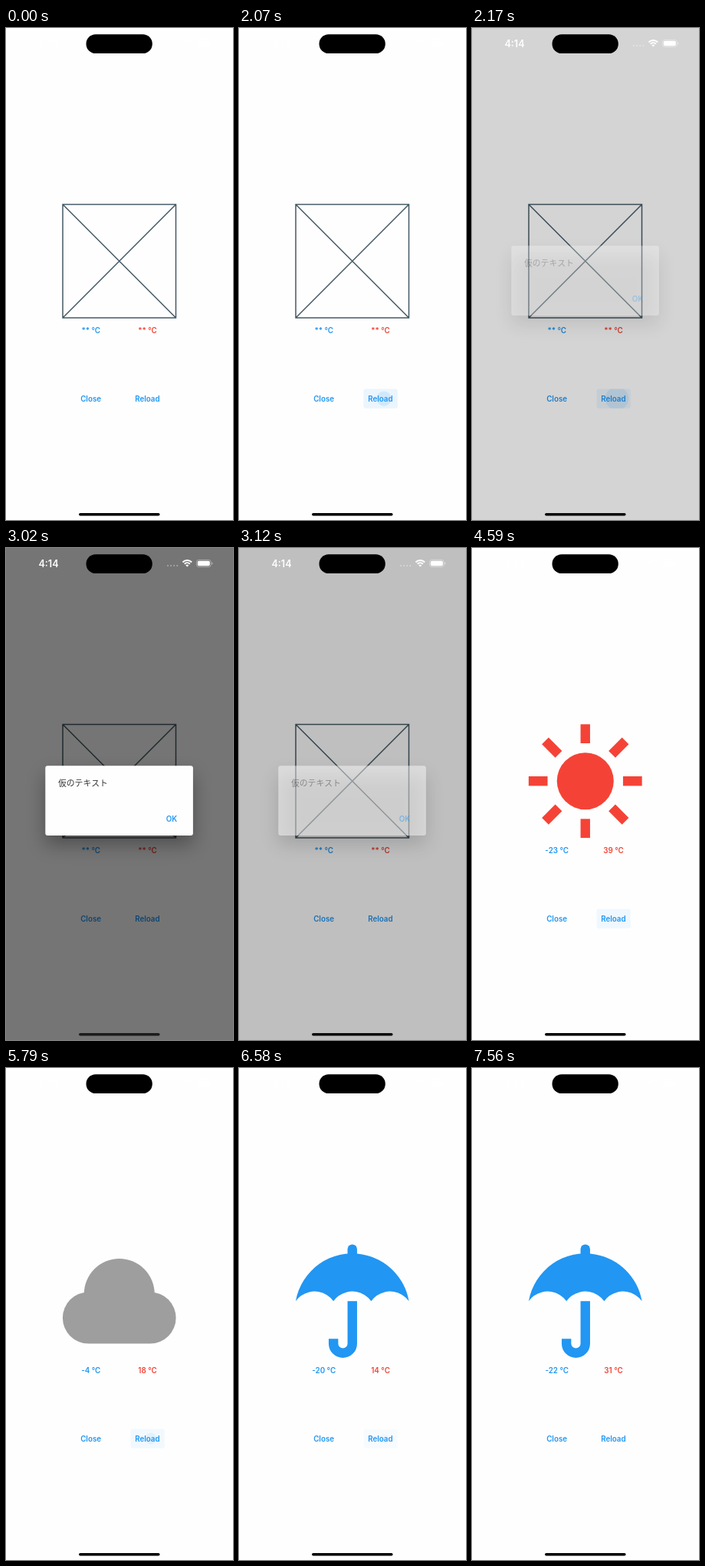
Recreate the animation shown at these times as an HTML page with a canvas. Size 296 by 640 pixels, loop 7.6 s.

```html
<!DOCTYPE html>
<html lang="ja">
<head>
<meta charset="utf-8">
<title>Weather</title>
<style>
  html, body { margin: 0; width: 100%; height: 100%; overflow: hidden; background: #fefefe; }
  canvas { display: block; width: 296px; height: 640px; }
</style>
</head>
<body>
<canvas id="stage"></canvas>
<script>
const W = 296, H = 640, LOOP = 7600;
const BLUE = '#2196f3', RED = '#f44336', GREY = '#9e9e9e', SLATE = '#455a64';
const LATIN = 'Inter, Roboto, sans-serif';
const CX = 147.75, CY = 303.2;
const FADE_OUT = 240, DIALOG_FADE = 150, DISMISS = 3010;

const canvas = document.getElementById('stage');
const ctx = canvas.getContext('2d');
const dpr = window.devicePixelRatio || 1;
canvas.width = W * dpr;
canvas.height = H * dpr;

// Bursts of screen updates: first change, last change, number of steps
const bursts = [
  [1960, 2390, 5], [3020, 3120, 2], [3300, 3870, 6], [4040, 4700, 7],
  [4810, 5460, 7], [5680, 6360, 7], [6470, 6830, 4], [7000, 7560, 6]
];

// Taps on Reload: finger down, highlight gone
const taps = [
  [1880, 2390], [3300, 3870], [3980, 4700], [4750, 5460],
  [5680, 6360], [6410, 6830], [6940, 7560]
].map(([down, end]) => ({ down, up: end - FADE_OUT, end }));

// Weather before the first tap and after each one; the first tap fails
const reports = [
  [placeholder, '**', '**'],
  [placeholder, '**', '**'],
  [sun, '-36', '25'],
  [sun, '-23', '39'],
  [cloud, '-4', '18'],
  [umbrella, '-20', '14'],
  [umbrella, '-8', '27'],
  [umbrella, '-22', '31']
];

const clamp = v => Math.max(0, Math.min(1, v));
const easeOut = v => 1 - (1 - v) * (1 - v);

// Holds the picture between updates; 5 ms of slack for rounded step times
function snap(t) {
  let shown = 0;
  for (const [from, to, n] of bursts) {
    if (t < from) break;
    const gap = (to - from) / (n - 1);
    shown = from + Math.min(n - 1, Math.floor((t - from + 5) / gap)) * gap;
  }
  return shown;
}

function roundRect(x, y, w, h, r, color) {
  ctx.beginPath();
  ctx.roundRect(x, y, w, h, r);
  ctx.fillStyle = color;
  ctx.fill();
}

function disc(x, y, r, color) {
  ctx.beginPath();
  ctx.arc(x, y, r, 0, Math.PI * 2);
  ctx.fillStyle = color;
  ctx.fill();
}

function label(text, x, y, color, font = '600 9.8px ' + LATIN, align = 'center') {
  ctx.font = font;
  ctx.textAlign = align;
  ctx.fillStyle = color;
  ctx.fillText(text, x, y);
}

function placeholder() {
  const x = 74, y = 229.5, s = 147.5;
  ctx.strokeStyle = SLATE;
  ctx.lineWidth = 1.5;
  ctx.beginPath();
  ctx.rect(x, y, s, s);
  ctx.moveTo(x, y);
  ctx.lineTo(x + s, y + s);
  ctx.moveTo(x + s, y);
  ctx.lineTo(x, y + s);
  ctx.stroke();
}

function sun() {
  disc(CX, CY, 37, RED);
  for (let i = 0; i < 8; i++) {
    ctx.save();
    ctx.translate(CX, CY);
    ctx.rotate(i * Math.PI / 4);
    ctx.fillRect(-6.2, -73.9, 12.4, 24.7);
    ctx.restore();
  }
}

function cloud() {
  disc(CX, 294, 46, GREY);
  roundRect(73.9, 291.4, 147.7, 67.2, 33.6, GREY);
}

function umbrella() {
  roundRect(CX - 6.2, 229.4, 12.4, 20, [6.2, 6.2, 0, 0], BLUE);

  const rim = 303.2, drop = 13, r = Math.hypot(73.8, drop);
  const tilt = Math.asin(drop / r);
  ctx.beginPath();
  ctx.arc(CX, rim + drop, r, Math.PI + tilt, -tilt);
  const sr = 30.3, half = Math.asin(24.6 / sr), sy = rim + sr * Math.cos(half);
  for (let i = 1; i >= -1; i--) {
    ctx.arc(CX + i * 49.2, sy, sr, -Math.PI / 2 + half, -Math.PI / 2 - half, true);
  }
  ctx.fill();

  ctx.strokeStyle = BLUE;
  ctx.lineWidth = 12.4;
  ctx.beginPath();
  ctx.moveTo(CX, 303.2);
  ctx.lineTo(CX, 358.5);
  ctx.arc(CX - 12.3, 358.5, 12.3, 0, Math.PI);
  ctx.lineTo(CX - 24.6, 352.3);
  ctx.stroke();
}

function highlight(t) {
  const tap = taps.find(({ down, end }) => t >= down && t < end);
  if (!tap) return;
  const { down, up, end } = tap;
  const glow = clamp((t - down) / 200) * clamp((end - t) / FADE_OUT);
  const held = Math.min(t, up) - down, after = Math.max(0, t - up);
  ctx.save();
  ctx.beginPath();
  ctx.roundRect(162.5, 469.5, 44.3, 25.2, 3);
  ctx.clip();
  ctx.fillStyle = `rgba(33,150,243,${0.09 * glow})`;
  ctx.fillRect(160, 468, 50, 30);
  const fade = glow * clamp(1 - after / 200);
  disc(189, 482, 4 + held * 0.03 + after * 0.12, `rgba(33,150,243,${0.14 * fade})`);
  ctx.restore();
}

function dialog(alpha) {
  if (alpha <= 0) return;
  ctx.save();
  ctx.globalAlpha = alpha;
  ctx.fillStyle = 'rgba(0,0,0,0.54)';
  ctx.fillRect(0, 0, W, H);
  ctx.shadowColor = 'rgba(0,0,0,0.32)';
  ctx.shadowBlur = 24 * dpr;
  ctx.shadowOffsetY = 12 * dpr;
  roundRect(51.3, 283.2, 192.6, 90.8, 3, '#fff');
  ctx.shadowColor = 'transparent';
  label('仮のテキスト', 68, 309.5, '#333', '400 10.8px "Noto Sans CJK JP", "Noto Sans CJK", sans-serif', 'left');
  label('OK', 216, 355.6, BLUE);
  ctx.restore();
}

function statusBar() {
  label('4:14', 55.5, 24.9, '#fff', '600 12.6px ' + LATIN);
  for (let i = 0; i < 4; i++) disc(211 + i * 4.1, 23, 1, 'rgba(255,255,255,0.4)');

  ctx.strokeStyle = '#fff';
  ctx.lineWidth = 2;
  for (const r of [5, 8.3]) {
    ctx.beginPath();
    ctx.arc(236.3, 24.3, r, -Math.PI * 0.75, -Math.PI * 0.25);
    ctx.stroke();
  }
  ctx.fillStyle = '#fff';
  ctx.beginPath();
  ctx.moveTo(236.3, 24.6);
  ctx.arc(236.3, 24.6, 2.9, -Math.PI * 0.75, -Math.PI * 0.25);
  ctx.fill();

  ctx.strokeStyle = 'rgba(255,255,255,0.45)';
  ctx.lineWidth = 0.8;
  ctx.beginPath();
  ctx.roundRect(248.4, 15.4, 18.8, 9.2, 3);
  ctx.stroke();
  roundRect(249.8, 16.7, 16, 6.6, 1.8, '#fff');
  roundRect(268.3, 18.5, 1.1, 3, [0, 1, 1, 0], 'rgba(255,255,255,0.5)');
}

function draw(t) {
  ctx.setTransform(dpr, 0, 0, dpr, 0, 0);
  ctx.fillStyle = '#fefefe';
  ctx.fillRect(0, 0, W, H);

  const [icon, low, high] = reports[taps.filter(({ up }) => up <= t).length];
  icon();
  label(low + ' °C', 110.7, 397.2, BLUE);
  label(high + ' °C', 184.5, 397.2, RED);
  highlight(t);
  label('Close', 110.6, 485.6, BLUE);
  label('Reload', 184.4, 485.6, BLUE);

  const opened = clamp((t - taps[0].up) / DIALOG_FADE);
  const closed = clamp((t - DISMISS) / DIALOG_FADE);
  const alpha = easeOut(Math.min(opened, 1 - closed));
  dialog(alpha);
  statusBar();
  roundRect(104.5, 8.2, 86.3, 24.9, 12.45, '#000');
  const tone = Math.round(28 * alpha);
  roundRect(95, 631, 105.6, 3.6, 1.8, `rgb(${tone},${tone},${tone})`);
}

const start = performance.now();
function tick() {
  draw(snap((performance.now() - start) % LOOP));
  requestAnimationFrame(tick);
}
tick();
</script>
</body>
</html>
```
